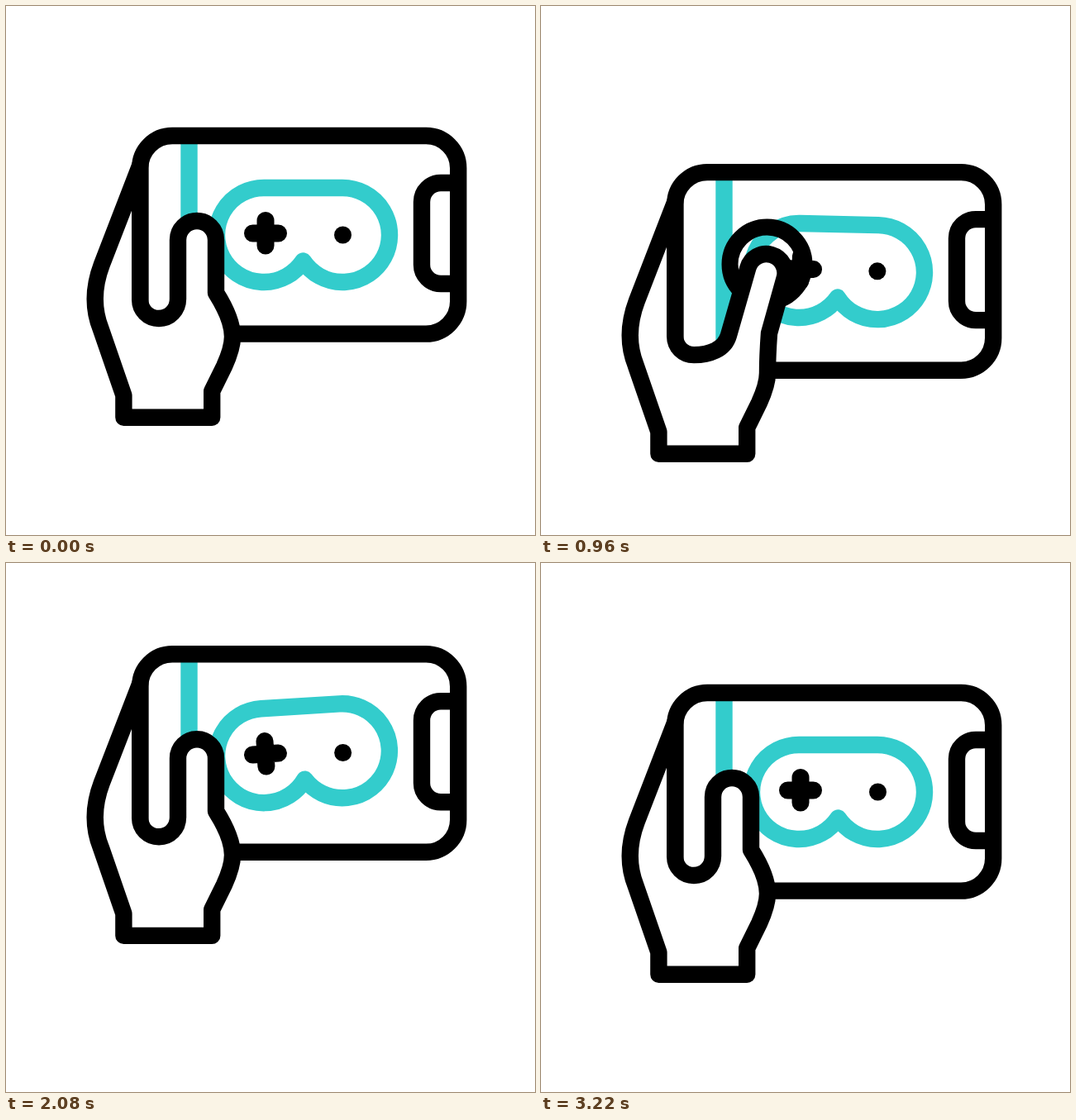
An HTML page that plays this animation: 640 px wide and 640 px high, repeating every 3.62 s.

```html
<!DOCTYPE html>
<html lang="en">
<head>
<meta charset="utf-8">
<title>Handheld game</title>
<style>
  html, body { margin: 0; height: 100%; overflow: hidden; background: #fff; }
  svg { display: block; width: 100%; height: 100%; }
  path, rect, circle { fill: none; stroke: #000; stroke-width: 20.4; stroke-linejoin: round; }
  .teal { stroke: #3cc; }
  #cross { stroke-width: 21; stroke-linecap: round; }
  #dot { fill: #000; stroke: none; }
  #hand { fill: #fff; }
</style>
</head>
<body>
<svg viewBox="0 0 640 640">
  <g id="scene">
    <path class="teal" d="M221.5 157V397"/>
    <g id="pad">
      <path class="teal" d="M312 220H407A57 57 0 1 1 359.5 308.5A57 57 0 1 1 312 220Z"/>
      <path id="cross" d="M298.5 275H329.5M314 259.5V290"/>
    </g>
    <circle id="dot" cx="407.5" cy="277" r="10.5"/>
    <path d="M547 214H526a23 23 0 0 0-23 23V313a23 23 0 0 0 23 23H547"/>
    <rect x="162.2" y="157" width="385" height="239.6" rx="39"/>
    <circle id="ring" cx="273.5" cy="268.5"/>
    <path id="hand"/>
  </g>
</svg>
<script>
const LOOP = 3620, TIP_RADIUS = 23;
const [scene, pad, dot, ring, hand] =
  ['scene', 'pad', 'dot', 'ring', 'hand'].map(id => document.getElementById(id));

const mix = (a, b, p) => a + (b - a) * p;
const ease = p => p * p * (3 - 2 * p);

// Eased value through [time, value] keys
function keyed(t, ...keys) {
  const next = keys.findIndex(([time]) => t < time);
  if (next === 0) return keys[0][1];
  if (next < 0) return keys[keys.length - 1][1];
  const [t0, a] = keys[next - 1], [t1, b] = keys[next];
  return mix(a, b, ease((t - t0) / (t1 - t0)));
}

// The thumb is a round tip on two parallel sides, tilted by its lean (0 to 1)
function handPath(lean) {
  const angle = lean * 16 * Math.PI / 180;
  const sin = Math.sin(angle), cos = Math.cos(angle);
  const tipX = mix(231, 272.5, lean), tipY = mix(283, 279, lean);
  const sideX = TIP_RADIUS * cos, sideY = TIP_RADIUS * sin;
  const left = [tipX - sideX, tipY - sideY], right = [tipX + sideX, tipY + sideY];

  const crookY = 354.5, crookX = left[0] - (crookY - left[1]) * sin / cos;
  const pull = mix(13, 18, lean);
  const crook = `C162 368 172 378 185 378` +
    `C${185 + pull} 378 ${crookX - pull * sin} ${crookY + pull * cos} ${crookX} ${crookY}`;
  const thumb = `L${left}A${TIP_RADIUS} ${TIP_RADIUS} 0 0 1 ${right}` +
    `L${mix(254, 276, lean)} ${mix(347, 352, lean)}`;
  return `M162.2 193V355${crook}${thumb}C${mix(266, 275, lean)} 366 274 384 274 400` +
    'C274 413 269 425 264 436L249.2 466V497.7H142.4V471L114.8 391C105.2 367 105.2 341 115.8 313Z';
}

function draw(now) {
  const t = now % LOOP;
  const lift = keyed(t, [200, 0], [1200, 51.5], [2200, -50.8], [3200, 0]);
  const tilt = keyed(t, [800, 0], [1600, 12], [2400, -12], [3200, 0]);
  const slide = keyed(t, [800, 0], [1500, -4.5], [2400, 2], [3200, 0]);
  const lean = keyed(t, [200, 0], [500, 1], [1000, 1], [1760, 0]);

  scene.setAttribute('transform', `translate(0 ${lift})`);
  pad.setAttribute('transform', `rotate(${tilt} 359.5 277)`);
  dot.setAttribute('transform', `translate(${slide} ${-Math.abs(tilt) / 5})`);
  hand.setAttribute('d', handPath(lean));
  ring.setAttribute('r', keyed(t, [700, 5], [960, 45], [1160, 52]));
  ring.style.strokeWidth = keyed(t, [700, 0], [760, 20], [960, 20], [1160, 0]);
  requestAnimationFrame(draw);
}
requestAnimationFrame(draw);
</script>
</body>
</html>
```
